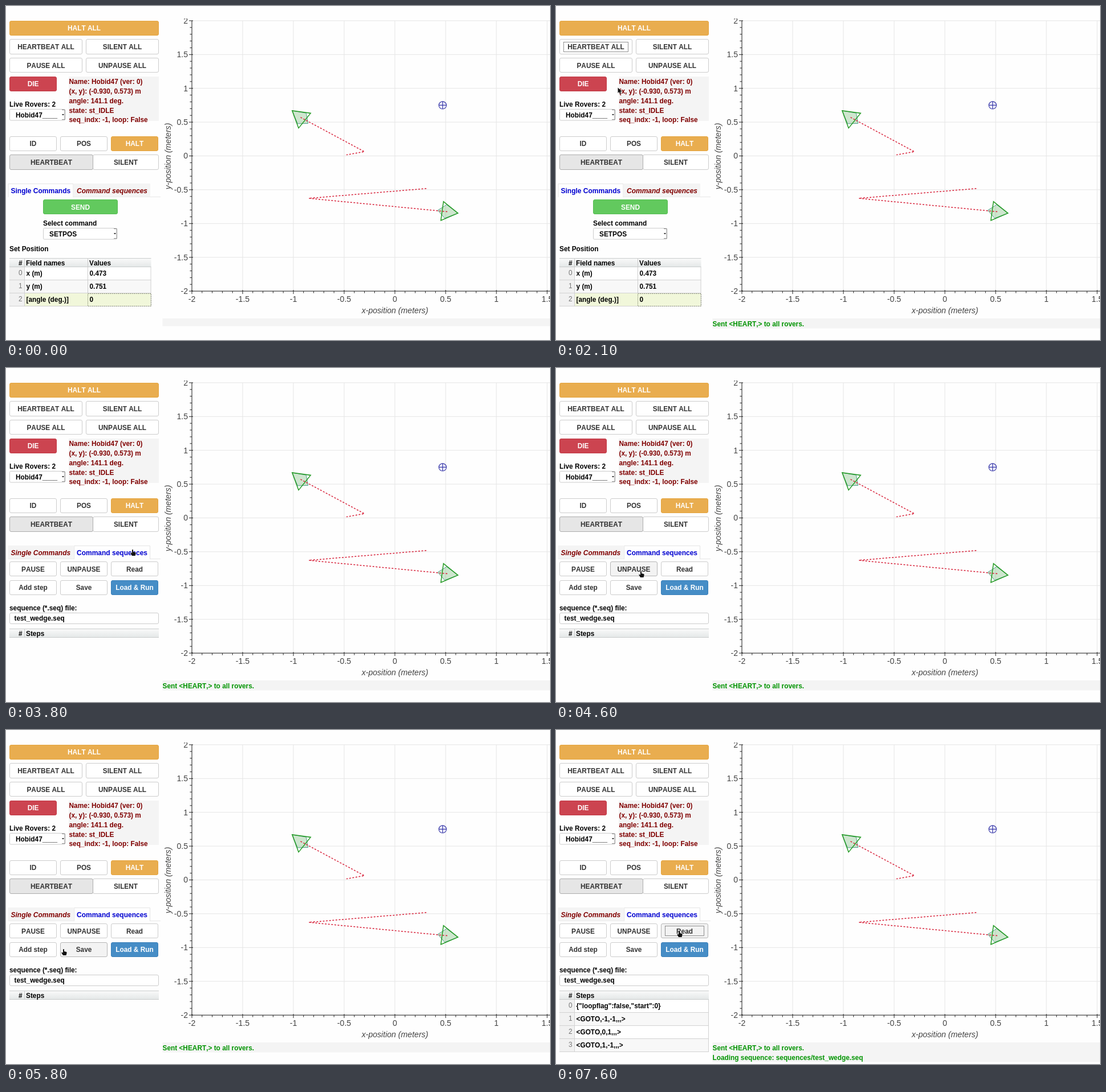
An HTML page that plays this animation: 954x587 px, repeating every 8 s.

```html
<!DOCTYPE html>
<html lang="en">
<head>
<meta charset="utf-8">
<title>Rover control panel</title>
<style>
html, body { margin: 0; width: 100%; height: 100%; overflow: hidden; background: #fefefe; }
svg { display: block; width: 954px; height: 587px; }
text { font: bold 11.85px "Liberation Sans", Arial, sans-serif; font-kerning: none; white-space: pre; }
.axis { font-size: 14.1px; font-weight: normal; fill: #444; }
.tab { font-size: 12px; }
.it { font-style: italic; }
.num { font-weight: normal; fill: #777; }
</style>
</head>
<body>
<svg id="stage" viewBox="0 0 954 587"></svg>
<script>
const stage = document.getElementById('stage');
const esc = s => String(s).replace(/&/g, '&amp;').replace(/</g, '&lt;');
const text = (x, y, s, fill = '#000', more = '') => `<text x="${x}" y="${y}" fill="${fill}" ${more}>${esc(s)}</text>`;
const rect = (x, y, w, h, fill, more = '') => `<rect x="${x}" y="${y}" width="${w}" height="${h}" fill="${fill}" ${more}/>`;
const path = (d, stroke, more = '') => `<path d="${d}" fill="none" stroke="${stroke}" ${more}/>`;
const poly = (pts, fill, stroke, more = '') => `<polygon points="${pts.join(' ')}" fill="${fill}" stroke="${stroke}" ${more}/>`;

// fill, border, hover fill, label colour
const styles = {
  plain: ['#fff', '#ccc', '#f3f3f3', '#333'],
  active: ['#e6e6e6', '#adadad', '#e6e6e6', '#333'],
  orange: ['#e9ad4f', '#e5a53f', '#e09a30', '#fff'],
  red: ['#cc4450', '#c23a46', '#b53640', '#fff'],
  green: ['#62c95e', '#57bd54', '#4fb04c', '#fff'],
  blue: ['#468dc6', '#3a80ba', '#3375ab', '#fff']
};

// label, x, y, width, style
const common = [
  ['HALT ALL', 6, 25.6, 262, 'orange'],
  ['HEARTBEAT ALL', 6, 58.3, 128], ['SILENT ALL', 140, 58.3, 128],
  ['PAUSE ALL', 6, 91, 128], ['UNPAUSE ALL', 140, 91, 128],
  ['DIE', 6, 123.7, 83, 'red'],
  ['ID', 6, 228.6, 83], ['POS', 95, 228.6, 83], ['HALT', 184, 228.6, 83, 'orange'],
  ['SILENT', 152, 261.4, 116], ['HEARTBEAT', 6, 261.4, 147, 'active']
];
const single = [['SEND', 65, 340, 131, 'green']];
const sequence = [
  ['PAUSE', 6, 340, 83], ['UNPAUSE', 95, 340, 83], ['Read', 184, 340, 83],
  ['Add step', 6, 372.7, 83], ['Save', 95, 372.7, 83], ['Load & Run', 184, 372.7, 83, 'blue']
];

// pointer: time, x, y
const track = [
  [800, 72.5, 9.5], [900, 72.5, 9.5], [1000, 76, 40], [1100, 81, 61], [1900, 81, 61],
  [2000, 95, 102], [2100, 108, 143], [2500, 140, 214], [2600, 149, 262], [2700, 149, 262],
  [2800, 158, 270], [3000, 178, 294], [3300, 214, 318], [3600, 222, 319], [4000, 222, 319],
  [4100, 214, 318], [4200, 214, 318], [4300, 174, 345], [4400, 156, 354], [4500, 156, 354],
  [4600, 149, 357], [4800, 212, 357], [5000, 230, 386], [5200, 196, 400], [5400, 200, 376],
  [5600, 150, 356], [5700, 120, 377], [5800, 101, 385], [6000, 95.5, 384], [6100, 95.5, 384],
  [6200, 101, 384], [6400, 101, 384], [6700, 140, 374], [7000, 205, 358], [7200, 216, 353], [8000, 216, 353]
];

function pointer(t) {
  if (t < track[0][0]) return null;
  const i = track.findIndex(k => k[0] > t);
  const [t0, x0, y0] = track[i - 1], [t1, x1, y1] = track[i];
  const p = (t - t0) / (t1 - t0);
  return [Math.round(x0 + (x1 - x0) * p), Math.round(y0 + (y1 - y0) * p)];
}

const inside = (p, x, y, w, h) => p && p[0] >= x && p[0] <= x + w && p[1] >= y && p[1] <= y + h;

function button([label, x, y, w, kind = 'plain'], p, focus, pressed) {
  const [fill, border, over, ink] = styles[kind];
  const hot = inside(p, x, y, w, 26);
  const edge = hot && kind === 'plain' ? '#b5b5b5' : border;
  const top = Math.round(y), height = Math.round(y + 26.3) - top;
  let s = rect(x + .5, top + .5, w - 1, height - 1, pressed ? '#e6e6e6' : hot ? over : fill, `rx="2.5" stroke="${edge}"`);
  if (focus) s += rect(x + 7.5, Math.round(y + 4.4) + .5, w - 15, 17, 'none', 'stroke="#777" stroke-width=".8"');
  return s + text(x + w / 2, Math.round(y + 17.5), label, ink, 'text-anchor="middle"');
}

function select(x, y, w, label) {
  const r = x + w;
  return rect(x + .5, y + .5, w - 1, 19.5, '#fff', 'rx="2" stroke="#ccc"') +
    text(x + 11, y + 14.5, label) +
    path(`M${r - 6} ${y + 1.5}H${r - .8}V${y + 18.5}H${r - 6}`, '#888') +
    poly([r - 6, y + 9, r - 2, y + 9, r - 4, y + 11.5], '#222', 'none');
}

function tabs(second, p) {
  const tab = (x, w, label, on) => {
    const hot = inside(p, x, 312, w, 23);
    return (on ? path(`M${x + .5} 336V312.5H${x + w - .5}V336`, '#e4e4e4') : rect(x, 312, w, 23.5, hot ? '#fefefe' : '#f4f4f4')) +
      text(x + 5, 329, label, on ? '#0000d0' : '#800000', `class="tab ${on ? '' : 'it'}"`);
  };
  return path(second ? 'M4 335.5H119M253 335.5H271' : 'M118 335.5H271', '#e6e6e6') +
    tab(3.5, 115, 'Single Commands', !second) + tab(119, 134, 'Command sequences', second);
}

function header(y, right, names) {
  return rect(6, y, right - 6, 16, 'url(#head)') +
    path(`M6 ${y + .5}H${right}M6 ${y + 15.5}H${right}`, '#c9cccc') +
    path(`M32.5 ${y}v16`, '#ccc') +
    text(22, y + 12.6, '#') + names.map(([x, s]) => text(x, y + 12.6, s)).join('');
}

function row(i, y, right, cells, fill = i % 2 ? '#f8f8f8' : '#fff') {
  return rect(6, y, right - 6, 23, fill) + rect(6, y, 26, 23, '#f1f1f1') +
    path(`M6 ${y + 22.5}H${right}M32.5 ${y}v23M${right - .5} ${y}v23`, '#d2d2d2') +
    text(22, y + 13.6, i, '', 'class="num"') +
    cells.map(([x, s]) => text(x, y + 15.3, s)).join('');
}

function singlePanel() {
  const fields = [['x (m)', '0.473'], ['y (m)', '0.751'], ['[angle (deg.)]', '0']];
  return text(65, 386, 'Select command') + select(65, 390, 130, 'SETPOS') + text(6, 430.5, 'Set Position') +
    header(443, 254.5, [[35, 'Field names'], [146, 'Values']]) +
    fields.map(([a, b], i) => row(i, 459 + 23 * i, 254.5, [[35.5, a], [146.5, b]], i === 2 ? '#f1f7da' : undefined)).join('') +
    path('M143.5 443V505', '#ccc') +
    rect(143.5, 505.5, 111, 22, 'none', 'stroke="#8a8f78" stroke-dasharray="2 1.5"');
}

function sequencePanel(t) {
  const steps = ['{"loopflag":false,"start":0}', '<GOTO,-1,-1,,,>', '<GOTO,0,1,,,>', '<GOTO,1,-1,,,>'];
  return text(6, 425.5, 'sequence (*.seq) file:') +
    rect(6.5, 430.5, 261, 19, '#fff', 'rx="2.5" stroke="#ccc"') + text(14.5, 444.4, 'test_wedge.seq') +
    header(458, 268, [[35, 'Steps']]) +
    (t < 7600 ? '' : steps.map((s, i) => row(i, 474 + 23 * i, 268, [[35.5, s]])).join(''));
}

function rover(x, y, deg) {
  const a = deg * Math.PI / 180, c = Math.cos(a), s = Math.sin(a);
  const at = ([u, v]) => [(x + u * c - v * s).toFixed(1), (y - u * s - v * c).toFixed(1)];
  return poly([[18.7, 0], [-3, 12], [-17, 0], [-3, -12]].map(at), 'rgba(0,128,0,.19)', '#4f9f8c') +
    poly([[18.7, 0], [-9.2, 16.8], [-9.2, -16.8]].map(at), 'none', '#229a22', 'stroke-width="1.5"');
}

function chart() {
  const X = v => 682 + v * 178, Y = v => 263.5 - v * 118.8;
  const left = X(-2), bottom = Y(-2);
  let grid = '', ticks = '', labels = '';
  for (let i = -20; i <= 20; i++) {
    const v = i / 10, major = i % 5 === 0;
    const x = X(v), y = Y(v), out = major ? 5 : 3.5, into = major ? 2 : 0;
    if (x < 954) ticks += `M${x} ${bottom - into}V${bottom + out}`;
    ticks += `M${left + into} ${y}H${left - out}`;
    if (!major) continue;
    grid += `M${left} ${y}H954` + (x < 954 ? `M${x} ${Y(2)}V${bottom}` : '');
    labels += text(319, y + 4.8, v, '', 'class="axis" text-anchor="end"') +
      (x < 954 ? text(x, 520.3, v, '', 'class="axis" text-anchor="middle"') : '');
  }
  const dash = 'stroke-width="1.5" stroke-dasharray="3 2.6"';
  return path(grid, '#e5e5e5') + path(`M${left} ${Y(2)}V${bottom}H954`, '#222') + path(ticks, '#222') +
    `<g clip-path="url(#top)">${labels}</g>` +
    text(682, 540, 'x-position (meters)', '', 'class="axis it" text-anchor="middle"') +
    text(0, 0, 'y-position (meters)', '', 'class="axis it" text-anchor="middle" transform="translate(289 264) rotate(-90)"') +
    rover(516.5, 195.7, 141.1) + rover(774, 361.5, -8) +
    path('M516.5 195.7L628.5 256L597 261.6', '#d8243c', dash) +
    path('M774 361.5L531 338L738 320.7', '#d8243c', dash) +
    `<circle cx="765.7" cy="174.4" r="6.6" fill="#f3f3ff" stroke="#3a3aa8" stroke-width="1.2"/>` +
    path('M759 174.4h13.4M765.7 167.7v13.4', '#3a3aa8', 'stroke-width="1.2"');
}

function cursor([x, y], hand) {
  const d = hand
    ? 'M-1 .5Q0-.5 1 .5V4L5 5Q6 5.5 5.5 7.5L4.5 11H-1L-3.5 7V5.5L-1 6.5Z'
    : 'M.5.5V10L2.8 8L4.3 11.7L6.2 11L4.7 7.5H8Z';
  return `<path transform="translate(${x} ${y})" d="${d}" fill="#111" stroke="#fff" stroke-width=".7" paint-order="stroke"/>`;
}

const info = ['Name: Hobid47 (ver: 0)', '(x, y): (-0.930, 0.573) m', 'angle: 141.1 deg.', 'state: st_IDLE', 'seq_indx: -1, loop: False'];
const fixed = '<defs><linearGradient id="head" x2="0" y2="1"><stop stop-color="#fafafa"/><stop offset="1" stop-color="#e3e7e7"/></linearGradient>' +
  '<clipPath id="top"><rect y="22" width="954" height="565"/></clipPath></defs>' +
  rect(110, 124, 158, 78, '#f4f4f4') +
  info.map((s, i) => text(110.5, 136.8 + 16.9 * i, s, '#800000')).join('') +
  text(6, 177, 'Live Rovers: 2') + select(6, 181, 98, 'Hobid47____') + chart();

function draw(t) {
  const p = pointer(t), second = t >= 3800;
  const buttons = common.concat(second ? sequence : single);
  const messages = [];
  if (t >= 1700) messages.push('Sent <HEART,> to all rovers.');
  if (t >= 7400) messages.push('Loading sequence: sequences/test_wedge.seq');
  const hand = buttons.some(([, x, y, w]) => inside(p, x, y, w, 26)) || inside(p, 4, 312, 249, 23);
  stage.innerHTML = fixed +
    buttons.map(b => button(b, p,
      b[0] === 'HEARTBEAT ALL' && t >= 1400 && t < 3700 || b[0] === 'Read' && t >= 7400,
      b[0] === 'HEARTBEAT ALL' && t >= 1300 && t < 1500)).join('') +
    tabs(second, p) + (second ? sequencePanel(t) : singlePanel()) +
    rect(274.5, 549, 680, messages.length ? 17 * messages.length + .5 : 13.5, '#f4f4f4') +
    messages.map((s, i) => text(274.5, 562.8 + 17 * i, s, '#009400')).join('') +
    (p ? cursor(p, hand) : '');
}

let last = -1;
function tick() {
  const t = Math.floor(performance.now() % 8000 / 100) * 100;
  if (t !== last) draw(last = t);
  requestAnimationFrame(tick);
}
tick();
</script>
</body>
</html>
```
